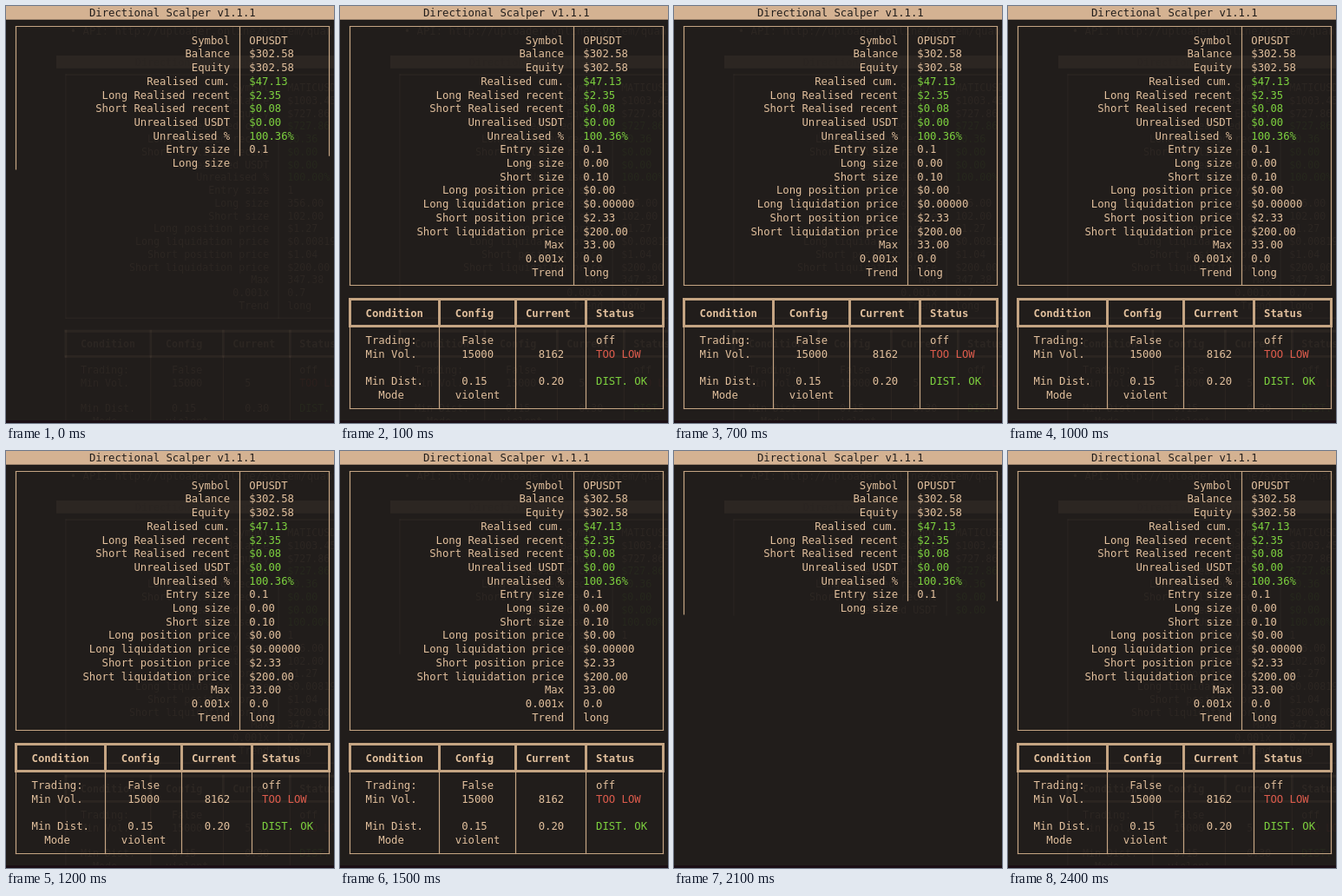
An HTML page with a canvas for the animation above (2.5 s loop, 378x480 px).

```html
<!DOCTYPE html>
<html lang="en">
<head>
<meta charset="utf-8">
<title>Terminal dashboard</title>
<style>
html, body { margin: 0; width: 100%; height: 100%; overflow: hidden; background: #211d1b; }
canvas { display: block; }
</style>
</head>
<body>
<canvas id="stage" width="378" height="480"></canvas>
<script>
const ctx = document.getElementById('stage').getContext('2d');
const CW = 7.375, RH = 15.7; // character cell
const INK = '#e2c09d', BAR = '#d4b292', LINE = '#c5a583', GREEN = '#7dd13f', RED = '#dc5b4c', BACK = '#211d1b';
const FONT = '12.25px "DejaVu Sans Mono", monospace';
const FULL = 99;

const labels = ['Symbol', 'Balance', 'Equity', 'Realised cum.', 'Long Realised recent',
  'Short Realised recent', 'Unrealised USDT', 'Unrealised %', 'Entry size', 'Long size',
  'Short size', 'Long position price', 'Long liquidation price', 'Short position price',
  'Short liquidation price', 'Max', '0.001x', 'Trend'];

const front = {
  values: ['OPUSDT', '$302.58', '$302.58', '$47.13', '$2.35', '$0.08', '$0.00', '100.36%', '0.1',
    '0.00', '0.10', '$0.00', '$0.00000', '$2.33', '$200.00', '33.00', '0.0', 'long'],
  volume: '8162', distance: '0.20'
};
const behind = {
  values: ['MATICUSDT', '$1003.45', '$727.86', '$727.86', '$0.36', '$0.00', '$0.00', '100.00%', '1',
    '356.00', '102.00', '$1.27', '$0.00819', '$1.04', '$200.00', '347.38', '0.7', 'long'],
  volume: '5', distance: '0.30'
};

// Last terminal row printed at each 100 ms step; a half is a row cut after its label.
const frontCuts = { 0: 10.5, 3: 0, 8: 4, 14: 0, 20: 1, 21: 10.5 };
const behindCuts = { 8: 10.5, 15: 10.5, 20: 8, 21: 8 };

function text(str, col, row, color = INK, align = 'left', bold = false) {
  ctx.font = (bold ? 'bold ' : '') + FONT;
  ctx.fillStyle = color;
  ctx.textAlign = align;
  ctx.fillText(str, col * CW, (row + .5) * RH + 4.5);
}

function line(c1, r1, c2, r2, width = 1.2) {
  const snap = v => Math.floor(v) + .5;
  ctx.lineWidth = width;
  ctx.beginPath();
  ctx.moveTo(snap(c1 * CW), snap((r1 + .5) * RH));
  ctx.lineTo(snap(c2 * CW), snap((r2 + .5) * RH));
  ctx.stroke();
}

function screen(data, cut) {
  const last = Math.floor(cut);
  ctx.save();
  ctx.beginPath();
  ctx.rect(0, 0, 378, (last + 1) * RH);
  if (cut > last) ctx.rect(0, (last + 1) * RH, 36 * CW, RH);
  ctx.clip();

  ctx.fillStyle = BAR;
  ctx.fillRect(0, 0, 378, RH);
  text('Directional Scalper v1.1.1', 13, 0, BACK);

  ctx.strokeStyle = LINE;
  ctx.lineCap = 'square';
  for (const row of [1, 20]) line(1.5, row, 50.5, row);
  for (const col of [1.5, 36.5, 50.5]) line(col, 1, col, 20);
  labels.forEach((label, i) => {
    text(label, 35, i + 2, INK, 'right');
    text(data.values[i], 38, i + 2, i > 2 && i < 8 ? GREEN : INK);
  });

  for (const row of [21, 23]) line(1.5, row, 50.5, row, 3);
  line(1.5, 29, 50.5, 29);
  for (const col of [1.5, 15.5, 27.5, 38.5, 50.5]) {
    line(col, 21, col, 23, 3);
    line(col, 23, col, 29);
  }
  [['Condition', 4], ['Config', 18], ['Current', 29], ['Status', 40]]
    .forEach(([name, col]) => text(name, col, 22, INK, 'left', true));
  text('Trading:', 4, 24);
  text('False', 19, 24);
  text('off', 40, 24);
  text('Min Vol.', 4, 25);
  text('15000', 19, 25);
  text(data.volume, 31, 25);
  text('TOO LOW', 40, 25, RED);
  text('Min Dist.', 4, 27);
  text('0.15', 19, 27);
  text(data.distance, 31, 27);
  text('DIST. OK', 40, 27, GREEN);
  text('Mode', 6, 28);
  text('violent', 18, 28);
  ctx.restore();
}

// Faint page showing through the translucent window
function backdrop(cut) {
  ctx.save();
  ctx.globalAlpha = .06;
  text('• API: http://uploader.online/system/quant', 10, 1.3);
  ctx.translate(58, 57);
  ctx.scale(.95, .94);
  screen(behind, cut);
  ctx.restore();
}

function draw() {
  const step = Math.floor(performance.now() / 100) % 25;
  ctx.fillStyle = BACK;
  ctx.fillRect(0, 0, 378, 480);
  backdrop(behindCuts[step] ?? FULL);
  ctx.fillStyle = '#1b0e15';
  ctx.fillRect(0, 477, 378, 3);
  screen(front, frontCuts[step] ?? FULL);
  requestAnimationFrame(draw);
}
draw();
</script>
</body>
</html>
```
